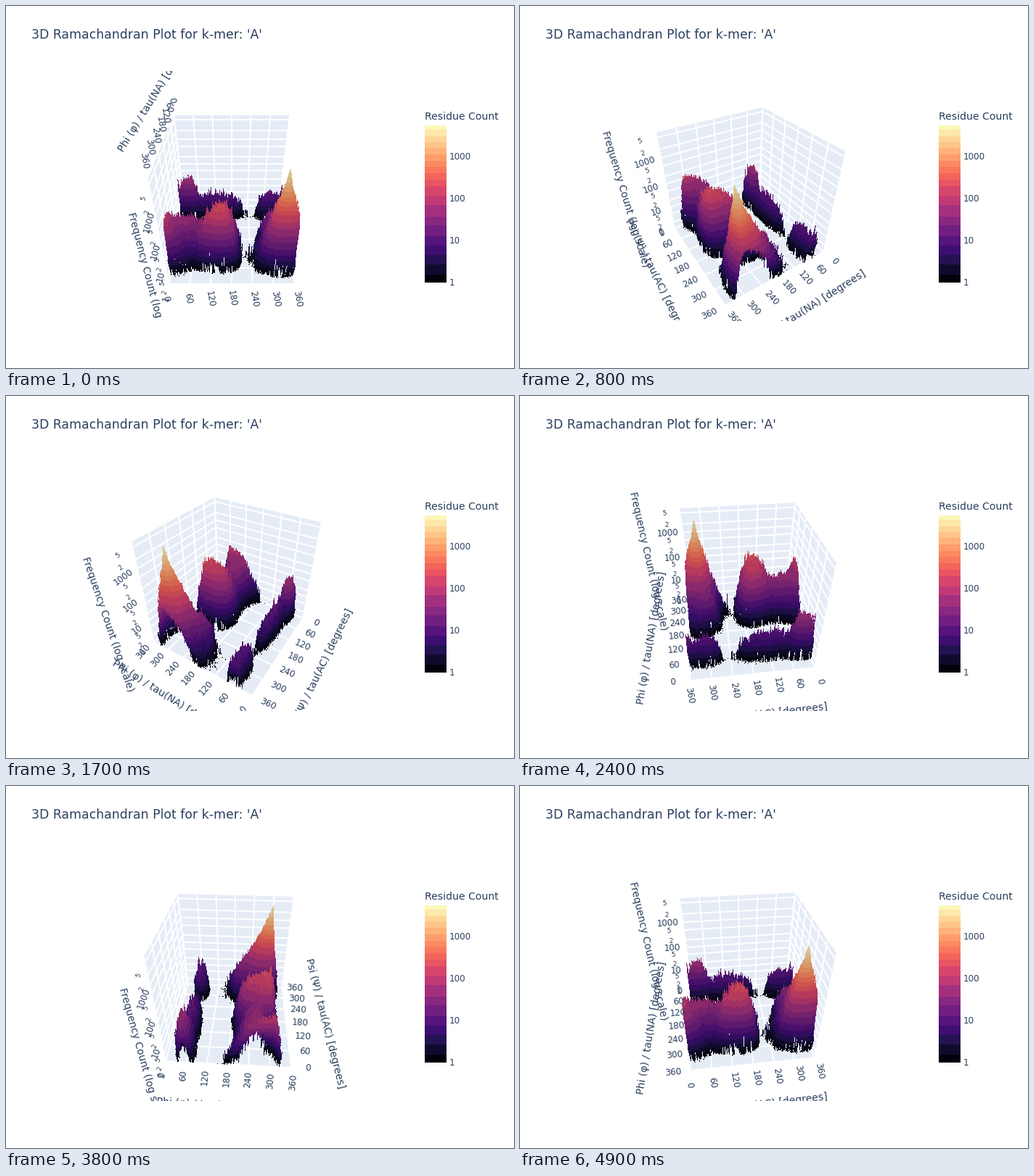
Recreate the animation shown at these times as a matplotlib script. Size 700 by 500 pixels, loop 5000 ms.

```python
import numpy as np
import matplotlib
import matplotlib.pyplot as plt
from matplotlib.animation import FuncAnimation
from matplotlib.collections import LineCollection, PolyCollection
from matplotlib.patches import Rectangle

matplotlib.rcParams["font.family"] = "DejaVu Sans"

W, H, DPI = 700, 500, 100
FRAMES, INTERVAL = 50, 100
LEFT, RIGHT, TOP, BOTTOM = 65, 557, 90, 435
CENTER_X, CENTER_Y = (LEFT + RIGHT) / 2, (TOP + BOTTOM) / 2 + 0.5
FOCAL = float((BOTTOM - TOP) / 2 / np.tan(np.pi / 8))
INK, WALL = "#2a3f5f", "#e5ecf6"
Z_AXIS, Z_PEAK = 3.86, 3.74
TICK_PAD, TITLE_PAD = 0.13, 0.35

DEGREES = [0, 60, 120, 180, 240, 300, 360]
COUNTS = [m * 10**e for e in range(4) for m in (1, 2, 5)]
ANGLE_POS = [d / 360 - 0.5 for d in DEGREES]
TICK_POS = [ANGLE_POS, ANGLE_POS, [np.log10(c) / Z_AXIS - 0.5 for c in COUNTS]]
DEGREE_NAMES = [str(d) for d in DEGREES]
COUNT_NAMES = [str(c) for c in COUNTS]
TITLES = ["Phi (φ) / tau(NA) [degrees]", "Psi (Ψ) / tau(AC) [degrees]",
          "Frequency Count (log scale)"]

# Colour bands, as heights on the colour bar
BAR_TOP, BAR_BOTTOM = 165, 382
BAND_Y = np.array([382, 371, 357, 344, 331, 318, 303, 291, 275, 263, 249, 240,
                   231, 222, 214, 205, 196, 188, 180, 171, 165])
BAND_EDGE = (BAR_BOTTOM - BAND_Y) / (BAR_BOTTOM - BAR_TOP)
BAND_RGBA = plt.get_cmap("magma")((BAND_EDGE[1:] + BAND_EDGE[:-1]) / 2)
SHADE = 0.85

# phi, psi, log height, then falloff toward lower/higher phi and psi
HELIX = (297, 318, Z_PEAK, 38, 10, 18, 28)
HILLS = [
    (288, 150, 2.15, 55, 23, 60, 38),
    (235, 155, 1.85, 37, 50, 52, 40),
    (255, 50, 1.45, 50, 35, 80, 80),
    (200, 300, 1.10, 22, 30, 35, 30),
    (57, 35, 1.60, 22, 22, 45, 30),
    (62, 130, 0.85, 24, 24, 105, 105),
    (62, 305, 0.85, 27, 27, 42, 60),
    (265, 238, 0.00, 45, 35, 28, 28),
]


def offsets(phi, psi, hill):
    p0, s0, _, p_lo, p_hi, s_lo, s_hi = hill
    dp = phi - p0
    ds = (psi - s0 + 180) % 360 - 180
    return dp / np.where(dp < 0, p_lo, p_hi), ds / np.where(ds < 0, s_lo, s_hi)


def height_map():
    rng = np.random.default_rng(7)
    angle = np.arange(0, 361, 2.0)
    phi, psi = np.meshgrid(angle, angle, indexing="ij")
    slope = np.hypot(*offsets(phi, psi, HELIX)) / Z_PEAK
    mean = 10 ** (Z_PEAK * (1 - slope**0.82))
    for hill in HILLS:
        u, v = offsets(phi, psi, hill)
        mean += 10 ** (hill[2] - u * u - v * v)
    level = np.log10(mean)
    level = np.where(level < 0.2, 0.2 + 2.1 * (level - 0.2), level)
    spread = np.clip(0.23 - 0.05 * level, 0.05, 0.23)
    counts = rng.poisson(10 ** (level + spread * rng.normal(size=level.shape)))
    z = np.where(counts > 0, np.log10(np.maximum(counts, 1)), np.nan)
    return np.minimum(z, Z_PEAK)


def refine(z):
    """Insert midpoints between rows."""
    out = np.empty((2 * len(z) - 1, z.shape[1]))
    out[::2] = z
    out[1::2] = (z[1:] + z[:-1]) / 2
    return out


def surface_points():
    z = refine(refine(height_map()).T).T
    parts = []
    for di, dj in ((1, 0), (0, 1)):
        a = z[:z.shape[0] - di, :z.shape[1] - dj]
        b = z[di:, dj:]
        i, j = np.nonzero(np.isfinite(a) & np.isfinite(b))
        a, b = a[i, j], b[i, j]
        n = np.ceil(np.abs(a - b) * 45).astype(int) + 1
        k = np.repeat(np.arange(len(n)), n)
        t = (np.arange(len(k)) - np.repeat(np.cumsum(n) - n, n)) / n[k]
        parts.append(np.stack([(i[k] + t * di) / 360 - 0.5,
                               (j[k] + t * dj) / 360 - 0.5,
                               a[k] + t * (b - a)[k]], axis=1))
    pts = np.concatenate(parts)
    band = np.clip(np.searchsorted(BAND_EDGE, pts[:, 2] / Z_PEAK) - 1,
                   0, len(BAND_RGBA) - 1)
    shaded = (BAND_RGBA * [SHADE, SHADE, SHADE, 1] * 255).astype(np.uint8)
    pts[:, 2] = pts[:, 2] / Z_AXIS - 0.5
    return pts.astype(np.float32), shaded[band]


POINTS, POINT_RGBA = surface_points()


def project(p, theta):
    """Screen x, y and depth seen from an eye circling at (2, 0, 1.5)."""
    p = np.asarray(p)
    x, y, z = p[..., 0], p[..., 1], p[..., 2]
    c, s = float(np.cos(theta)), float(np.sin(theta))
    near, right = x * c + y * s, y * c - x * s
    depth = 2.5 - 0.8 * near - 0.6 * z
    scale = FOCAL / depth
    return (CENTER_X + right * scale,
            CENTER_Y - (0.8 * z - 0.6 * near) * scale, depth)


def to_screen(p, theta):
    x, y, _ = project(p, theta)
    return np.stack([x, y], axis=-1)


def render_surface(theta):
    x, y, depth = project(POINTS, theta)
    order = np.argsort(-depth)
    col = np.clip(x[order].astype(int) - LEFT, 0, RIGHT - LEFT - 1)
    row = np.clip(y[order].astype(int) - TOP, 0, BOTTOM - TOP - 1)
    img = np.zeros((BOTTOM - TOP, RIGHT - LEFT, 4), np.uint8)
    img[row, col] = POINT_RGBA[order]
    return img


def vec(**axes):
    return np.array([axes.get(k, 0.0) for k in "xyz"], float)


def wall(axis, value):
    """Corners and grid lines of one box face."""
    b, c = [k for k in range(3) if k != axis]

    def at(u, v):
        p = np.zeros(3)
        p[axis], p[b], p[c] = value, u, v
        return p

    face = [at(-.5, -.5), at(.5, -.5), at(.5, .5), at(-.5, .5)]
    lines = [(at(t, -.5), at(t, .5)) for t in TICK_POS[b]]
    lines += [(at(-.5, t), at(.5, t)) for t in TICK_POS[c]]
    return face, lines


def text_angle(p, direction, theta):
    (x0, y0), (x1, y1) = to_screen([p, p + 0.02 * direction], theta)
    if x1 < x0:
        x0, y0, x1, y1 = x1, y1, x0, y0
    angle = np.degrees(np.arctan2(y0 - y1, x1 - x0))
    return -80 if abs(angle) > 89 else angle


def label(p, text, size, angle, theta):
    x, y = to_screen(p, theta)
    scene.text(x, y, text, size=size * 72 / DPI, color=INK, rotation=angle,
               ha="center", va="center", clip_on=True, zorder=4)


def draw_axis(axis, mid, out, names, theta):
    along = np.eye(3)[axis]
    angle = text_angle(mid + TICK_PAD * out, out, theta)
    for pos, name in zip(TICK_POS[axis], names):
        minor = axis == 2 and name[0] != "1"
        label(mid + pos * along + TICK_PAD * out, name[0] if minor else name,
              9 if minor else 12, angle, theta)
    center = mid + TITLE_PAD * out
    label(center, TITLES[axis], 14, text_angle(center, along, theta), theta)


fig = plt.figure(figsize=(W / DPI, H / DPI), dpi=DPI, facecolor="white")
page = fig.add_axes([0, 0, 1, 1])
scene = fig.add_axes([LEFT / W, 1 - BOTTOM / H,
                      (RIGHT - LEFT) / W, (BOTTOM - TOP) / H])
faces = PolyCollection([], facecolors=WALL, edgecolors="none", zorder=1)
grid = LineCollection([], colors="white", linewidths=2 * 72 / DPI, zorder=2)
scene.add_collection(faces, autolim=False)
scene.add_collection(grid, autolim=False)
surface = scene.imshow(np.zeros((BOTTOM - TOP, RIGHT - LEFT, 4), np.uint8),
                       extent=(LEFT, RIGHT, BOTTOM, TOP), aspect="auto",
                       interpolation="nearest", zorder=3)
scene.set(xlim=(LEFT, RIGHT), ylim=(BOTTOM, TOP))
page.set(xlim=(0, W), ylim=(H, 0))
scene.axis("off")
page.axis("off")


def page_text(x, y, text, size, va="baseline"):
    page.text(x, y, text, size=size * 72 / DPI, color=INK, va=va)


page_text(35, 45, "3D Ramachandran Plot for k-mer: 'A'", 17.2)
page_text(577, 157, "Residue Count", 14)
for low, high, rgba in zip(BAND_Y[:-1], BAND_Y[1:], BAND_RGBA):
    page.add_patch(Rectangle((577, high), 30, low - high, fc=rgba, lw=0,
                             antialiased=False))
for k in range(4):
    page_text(611, BAR_BOTTOM - 58 * k, str(10**k), 12, "center")


def update(i):
    theta = 2 * np.pi * i / FRAMES
    sx = 1 if np.cos(theta) >= 0 else -1
    sy = 1 if np.sin(theta) >= 0 else -1

    walls = [wall(0, -sx / 2), wall(1, -sy / 2), wall(2, -0.5)]
    faces.set_verts([to_screen(face, theta) for face, _ in walls])
    grid.set_segments([to_screen(line, theta)
                       for _, lines in walls for line in lines])
    surface.set_data(render_surface(theta))

    for old in list(scene.texts):
        old.remove()
    phi_mid, phi_out = vec(y=sy / 2, z=-0.5), vec(y=sy)
    if i == 0:
        # Head-on view: the phi scale sits on the top left edge
        phi_mid, phi_out = vec(y=-0.5, z=0.5), vec(z=1)
    draw_axis(0, phi_mid, phi_out, DEGREE_NAMES, theta)
    draw_axis(1, vec(x=sx / 2, z=-0.5), vec(x=sx), DEGREE_NAMES, theta)

    sides = [(vec(x=sx / 2, y=-sy / 2), vec(x=sx)),
             (vec(x=-sx / 2, y=sy / 2), vec(y=sy))]
    z_mid, z_out = min(sides, key=lambda side: to_screen(side[0], theta)[0])
    draw_axis(2, z_mid, z_out, COUNT_NAMES, theta)
    return []


anim = FuncAnimation(fig, update, frames=FRAMES, interval=INTERVAL,
                     init_func=lambda: [], repeat=True, repeat_delay=0)
plt.show()
```
